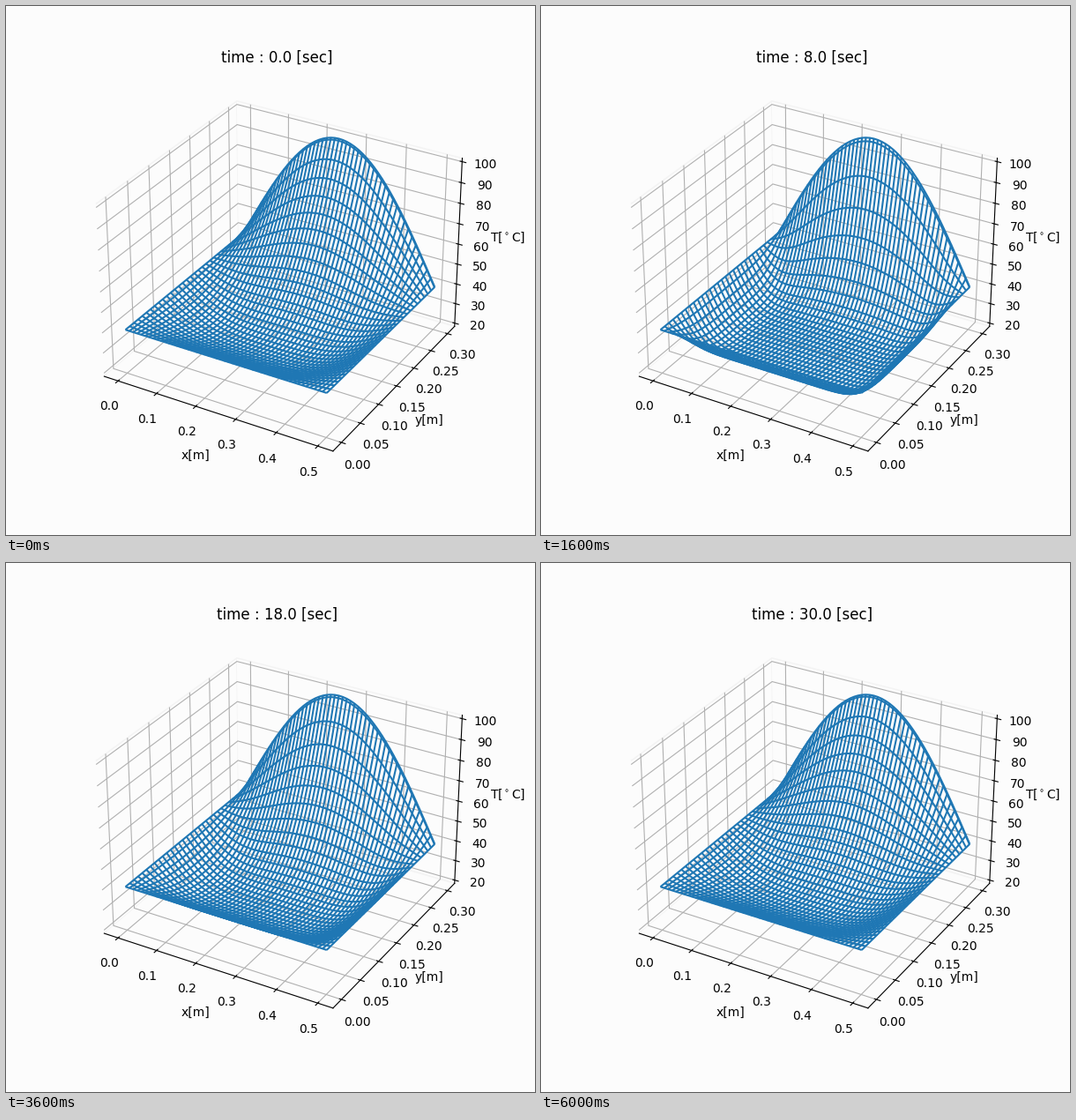
A matplotlib script that plays this animation: 600 by 600 pixels, repeating every 6200 ms.

```python
import numpy as np
import matplotlib.pyplot as plt
from matplotlib.animation import FuncAnimation

LX, LY = 0.5, 0.3             # plate size [m]
T_INIT, T_EDGE, T_PEAK = 20.0, 40.0, 100.0
ALPHA = 1.2e-4                # thermal diffusivity [m^2/s]
FRAMES, INTERVAL = 31, 200
BG = "#fcfcfc"

x = np.linspace(0, LX, 51)
y = np.append(np.linspace(0, LY - 0.001, 31), LY)
X, Y = np.meshgrid(x, y)
modes = np.arange(1, 121)
k = np.pi / LX
hump = np.sin(k * x)
steady = T_EDGE + (T_PEAK - T_EDGE) * np.outer(np.sinh(k * y) / np.sinh(k * LY), hump)


def series(s, length, coef, t):
    """Decaying sine series on [0, length]."""
    w = modes * np.pi / length
    return np.sin(np.outer(s, w)) @ (coef * np.exp(-ALPHA * w**2 * t))


def temperature(t):
    """Plate with fixed edges, heated along the far side."""
    if t == 0:
        T = steady.copy()
        T[1:-1, 1:-1] = T_INIT
        return T
    npi = modes * np.pi
    flat = 2 * (1 - (-1.0) ** modes) / npi
    rise = -2 * (-1.0) ** modes * npi / (npi**2 + (k * LY) ** 2)
    cold = np.outer(series(y, LY, flat, t), series(x, LX, flat, t))
    lag = np.outer(series(y, LY, rise, t), hump) * np.exp(-ALPHA * k**2 * t)
    return steady - (T_EDGE - T_INIT) * cold - (T_PEAK - T_EDGE) * lag


def padded(lo, hi, margin=0.0):
    m = (hi - lo) * margin
    lo, hi = lo - m, hi + m
    pad = (hi - lo) / 48
    return lo - pad, hi + pad


fig = plt.figure(figsize=(6, 6), dpi=100, facecolor=BG)
ax = fig.add_subplot(projection="3d", facecolor=BG)
for axis in (ax.xaxis, ax.yaxis, ax.zaxis):
    axis.set_pane_color(BG, 1.0)
    axis.pane.set_edgecolor("#f3f3f3")
ax.set_xlabel("x[m]")
ax.set_ylabel("y[m]")
ax.zaxis.set_rotate_label(False)
ax.set_zlabel(r"T[$^\circ$C]", rotation=0)
title = ax.set_title("", y=1.0)
title.set_y(1.0)  # 3D axes lower their titles
mesh = None


def update(i):
    global mesh
    if mesh is not None:
        mesh.remove()
    T = temperature((i - 1) % FRAMES)
    mesh = ax.plot_wireframe(X, Y, T, rstride=1, cstride=1, color="#1f77b4", linewidth=1.5)
    ax.set_xlim(*padded(0, LX, 0.05))
    ax.set_ylim(*padded(0, LY, 0.05))
    ax.set_zlim(*padded(T_INIT, T_PEAK))
    title.set_text(f"time : {i:.1f} [sec]")
    return mesh, title


anim = FuncAnimation(fig, update, frames=FRAMES, init_func=lambda: [],
                     interval=INTERVAL, repeat=True, repeat_delay=0)
plt.show()
```
